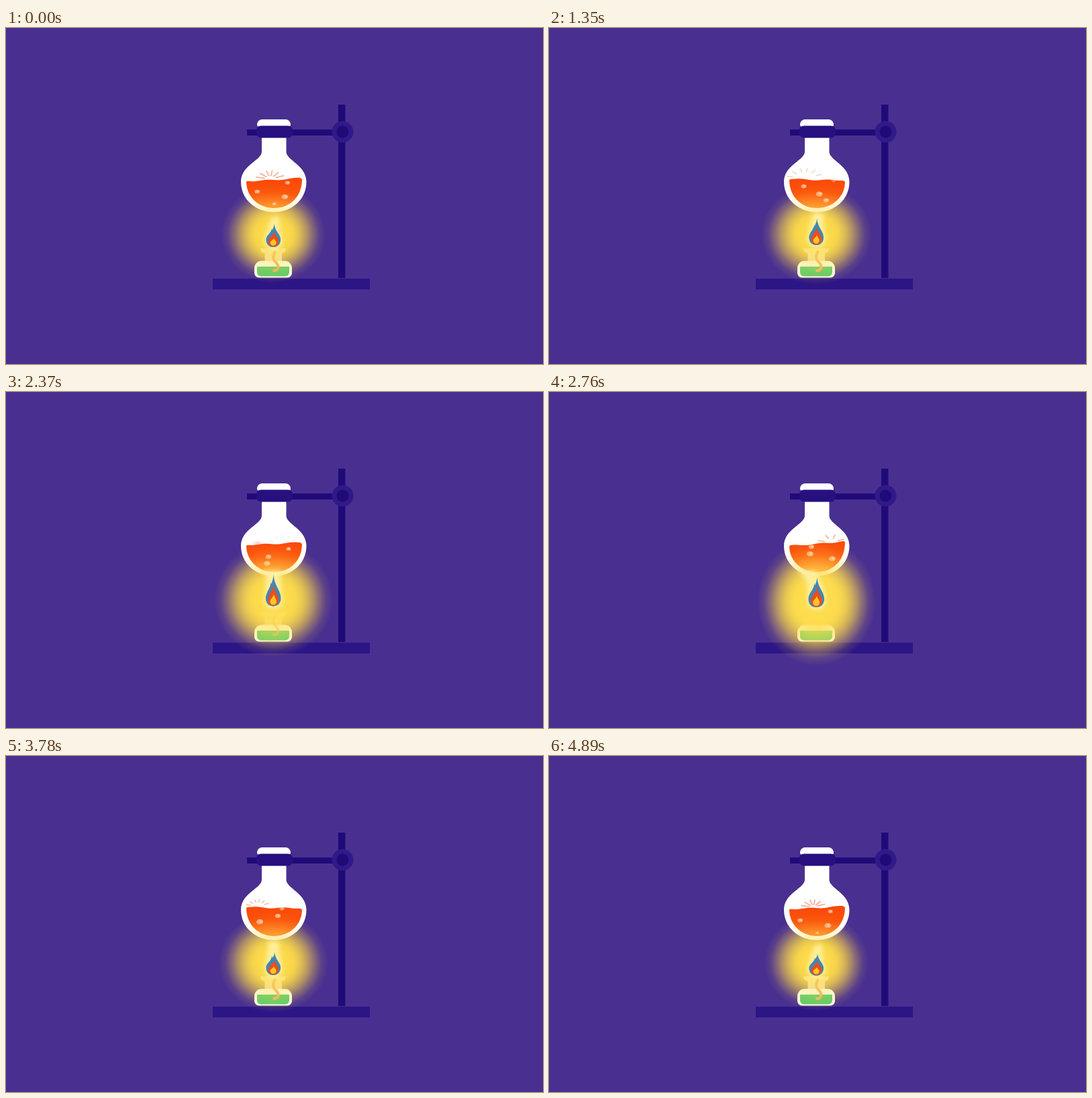
Write an HTML page with a canvas that moves like this. It is 800 by 500 pixels and loops after 4.92 s.

```html
<!DOCTYPE html>
<html lang="en">
<head>
<meta charset="utf-8">
<title>Flask over a burner</title>
<style>
  html, body { margin: 0; width: 100%; height: 100%; overflow: hidden; background: #492f90; }
  canvas { display: block; }
</style>
</head>
<body>
<canvas id="stage" width="800" height="500"></canvas>
<script>
const ctx = document.getElementById('stage').getContext('2d');
const LOOP = 4920;
const TAU = Math.PI * 2;
const RISE = 0.041;   // bubble speed, px per ms
const BUBBLES = 20;   // bubbles per loop
const SPLASH = 300;   // ms a splash lasts

// Signed time from a moment, wrapped around the loop
function since(t, at) {
  const d = ((t - at) % LOOP + LOOP) % LOOP;
  return d > LOOP / 2 ? d - LOOP : d;
}

// Oscillation that runs a whole number of times per loop
const wave = (t, count, phase) => Math.cos(TAU * (t / LOOP * count - phase));

// Single soft pulse
const pulse = (t, at, width) => Math.exp(-((since(t, at) / width) ** 2));

function poseAt(t) {
  const power = ((1 + wave(t, 1, .51)) / 2) ** 1.5;
  const surge = pulse(t, 2800, 450);
  const lick = wave(t, 9, .28);
  const tipY = 290 - 10 * power - 8 * lick - 4 * surge;
  return {
    surge,
    tipX: 399.5 - lick,
    tipY,
    midX: 398.5,
    foot: 326 - (292 - tipY) * .35,
    wide: 10.6 + surge,
    split: 8 + 4 * lick,
    rx: 78 + 11 * power,
    ry: 73 + 6 * power + 17 * surge,
    cy: 307 + 5 * surge,
    tint: .58 + .12 * power + .23 * surge,
    hotX: 402 - 28 * pulse(t, 3050, 500),
    hotY: 281 - 15 * power,
    hotW: 5 + 9 * power,
    tilt: 2 + 5 * wave(t, 2, .15)
  };
}

function box(x, y, w, h, color, r = 0) {
  ctx.fillStyle = color;
  ctx.beginPath();
  ctx.roundRect(x, y, w, h, r);
  ctx.fill();
}

function oval(x, y, rx, ry, color) {
  ctx.fillStyle = color;
  ctx.beginPath();
  ctx.ellipse(x, y, rx, ry, 0, 0, TAU);
  ctx.fill();
}

// Elliptic light with a smooth falloff
function light(p, rgb, strength) {
  ctx.save();
  ctx.translate(398.5, p.cy);
  ctx.scale(p.rx, p.ry);
  const g = ctx.createRadialGradient(0, 0, 0, 0, 0, 1);
  for (let r = 0; r <= 1; r += .125) {
    const a = Math.min(1, 1.25 * (1 - r * r) ** 2) * strength;
    g.addColorStop(r, `rgba(${rgb},${a})`);
  }
  ctx.fillStyle = g;
  ctx.fillRect(-1, -1, 2, 2);
  ctx.restore();
}

function drop(tx, ty, cx, foot, w, color) {
  const my = foot - w * 1.05, h = my - ty;
  ctx.fillStyle = color;
  ctx.beginPath();
  ctx.moveTo(tx, ty);
  ctx.bezierCurveTo(tx + 1, ty + h * .5, cx + w, my - h * .35, cx + w, my);
  ctx.bezierCurveTo(cx + w, foot - w * .35, cx + w * .55, foot, cx, foot);
  ctx.bezierCurveTo(cx - w * .55, foot, cx - w, foot - w * .35, cx - w, my);
  ctx.bezierCurveTo(cx - w, my - h * .35, tx - 1, ty + h * .5, tx, ty);
  ctx.fill();
}

function drawStand() {
  const dark = '#1f0a78';
  box(308, 373, 234, 16, '#2c1585');
  box(495, 114, 10.5, 258, dark);
  box(359, 151, 136, 9, dark);
  oval(501.5, 154.5, 16, 16, '#301988');
  oval(501.5, 154.5, 9, 9, dark);
}

function drawBurner(p) {
  ctx.globalAlpha = 1 - p.surge;
  ctx.fillStyle = 'rgba(255,246,200,.75)';
  ctx.beginPath();
  ctx.moveTo(379, 328);
  ctx.lineTo(417, 328);
  ctx.quadraticCurveTo(417, 334, 411, 335);
  ctx.lineTo(411, 347);
  ctx.lineTo(385.5, 347);
  ctx.lineTo(385.5, 335);
  ctx.quadraticCurveTo(379, 334, 379, 328);
  ctx.fill();
  ctx.globalAlpha = 1;

  box(370, 346.5, 56, 25, '#fffbe6', [11, 11, 7, 7]);
  box(374, 355, 48, 14.5, '#5fcb68', [1, 1, 6, 6]);

  ctx.globalAlpha = 1 - p.surge;
  ctx.strokeStyle = '#eeb363';
  ctx.lineWidth = 4;
  ctx.lineCap = 'round';
  ctx.beginPath();
  ctx.moveTo(400.5, 333);
  ctx.bezierCurveTo(393, 348, 406, 347, 405.5, 356);
  ctx.quadraticCurveTo(405, 361, 399, 361);
  ctx.stroke();
  ctx.globalAlpha = 1;
}

function drawFlask() {
  box(374, 136, 50, 10.5, '#fff', [8, 8, 3, 3]);
  ctx.fillStyle = '#fff';
  ctx.beginPath();
  ctx.moveTo(381, 160);
  ctx.lineTo(381, 184);
  ctx.bezierCurveTo(381, 197, 350, 204, 350, 229);
  ctx.bezierCurveTo(350, 255, 372, 274, 399, 274);
  ctx.bezierCurveTo(426, 274, 447.5, 255, 447.5, 229);
  ctx.bezierCurveTo(447.5, 204, 417.5, 197, 417.5, 184);
  ctx.lineTo(417.5, 160);
  ctx.fill();
  box(373, 145.5, 54, 18, '#27107f', 7);
}

function surfaceY(x, p, t) {
  const u = (x - 399.5) / 83;
  return 226 - p.tilt * u - 3 * u * u + .8 * Math.sin(u * 13 - t / LOOP * TAU * 6);
}

const bottomY = x => 228 + 40 * Math.sqrt(1 - ((x - 399.5) / 42) ** 2);

function drawLiquid(p, t) {
  const g = ctx.createLinearGradient(0, 222, 0, 269);
  g.addColorStop(0, '#fb4709');
  g.addColorStop(.5, '#fb530b');
  g.addColorStop(1, '#fd7c22');
  ctx.fillStyle = g;
  ctx.beginPath();
  ctx.moveTo(358, surfaceY(358, p, t) + 1);
  for (let x = 360; x <= 439; x += 2) ctx.lineTo(x, surfaceY(x, p, t));
  ctx.lineTo(441, surfaceY(441, p, t) + 2);
  ctx.bezierCurveTo(441, 252, 422, 268, 399, 268);
  ctx.bezierCurveTo(377, 268, 358, 252, 358, surfaceY(358, p, t) + 1);
  ctx.fill();
}

function drawBubble(x, y, size, top) {
  const depth = bottomY(x) - 3 - y;
  if (depth < 0) return;
  const r = size * Math.min(1, .35 + depth / 14);
  ctx.globalAlpha = Math.min(1, (y - top + 2) / 5);
  oval(x, y, r * 1.1, r * .82, 'rgba(255,196,160,.72)');
  oval(x + r * .25, y - r * .1, r * .5, r * .45, 'rgba(255,225,205,.55)');
  ctx.globalAlpha = 1;
}

function drawSplash(x, y, u, rays, reach) {
  const far = reach * (.45 + u * 1.1);
  const near = far * (.15 + u * .7);
  ctx.strokeStyle = '#f4a48c';
  ctx.lineCap = 'round';
  ctx.lineWidth = 1.7 - u * .6;
  ctx.globalAlpha = Math.min(1, u * 5, (1 - u) * 2.6);
  for (let i = 0; i < rays; i++) {
    const a = -Math.PI * (.93 - .8 * i / (rays - 1));
    const dx = Math.cos(a) * (1 + .5 * Math.abs(Math.cos(a)));
    const dy = Math.sin(a) * .85;
    ctx.beginPath();
    ctx.moveTo(x + dx * near, y + dy * near);
    ctx.lineTo(x + dx * far, y + dy * far);
    ctx.stroke();
  }
  ctx.globalAlpha = 1;
}

// Each bubble climbs to the surface and bursts there
function drawFizz(p, t) {
  for (let i = 0; i < BUBBLES; i++) {
    const x = 399 + 25 * Math.sin(i * 2.4 - .2);
    const age = since(t, i * LOOP / BUBBLES - 110);
    const top = surfaceY(x, p, t);
    if (age < 0) {
      drawBubble(x, top - age * RISE, 4 + .8 * Math.sin(i * 5), top);
    } else if (age < SPLASH) {
      const rays = 4 + Math.round(2 * Math.cos(i * 1.3));
      drawSplash(x, top - 1, age / SPLASH, rays, 13 + 4 * Math.cos(i));
    }
  }
}

// Pale hot air around and above the flame
function drawHotAir(p) {
  const w = p.wide + 3, y = p.foot - 12, bend = (p.tipY + p.hotY) / 2 + 6;
  ctx.save();
  ctx.filter = 'blur(3px)';
  ctx.fillStyle = 'rgba(255,243,170,.85)';
  ctx.beginPath();
  ctx.moveTo(p.hotX - p.hotW, p.hotY);
  ctx.lineTo(p.hotX + p.hotW, p.hotY);
  ctx.quadraticCurveTo(p.midX + 8, bend, p.midX + w, y);
  ctx.quadraticCurveTo(p.midX + w, p.foot + 4, p.midX, p.foot + 4);
  ctx.quadraticCurveTo(p.midX - w, p.foot + 4, p.midX - w, y);
  ctx.quadraticCurveTo(p.midX - 8, bend, p.hotX - p.hotW, p.hotY);
  ctx.fill();
  ctx.restore();
}

function drawFlame(p) {
  const { tipX, tipY, midX, foot, wide } = p;
  const h = foot - tipY;
  const blue = '#4486b2', red = '#ed4d1b';
  drop(tipX - 4, tipY + p.split, midX - .5, foot, wide, blue);
  drop(tipX, tipY, midX, foot, wide, blue);
  drop(tipX - 3, tipY + h * .45, midX - .3, foot - 1, wide * .7, red);
  drop(tipX, tipY + h * .34, midX, foot - 1, wide * .72, red);
  drop(midX + .5, foot - h * .38, midX - .3, foot - 2, wide * .43, '#ffc524');
}

function draw(now) {
  const t = now % LOOP;
  const p = poseAt(t);
  ctx.fillStyle = '#492f90';
  ctx.fillRect(0, 0, 800, 500);
  drawStand();
  light(p, '250,214,66', 1);
  drawBurner(p);
  drawFlask();
  drawLiquid(p, t);
  drawFizz(p, t);
  light(p, '254,221,78', p.tint);
  drawHotAir(p);
  drawFlame(p);
}

const start = performance.now();
function tick() {
  draw(performance.now() - start);
  requestAnimationFrame(tick);
}
tick();
</script>
</body>
</html>
```
